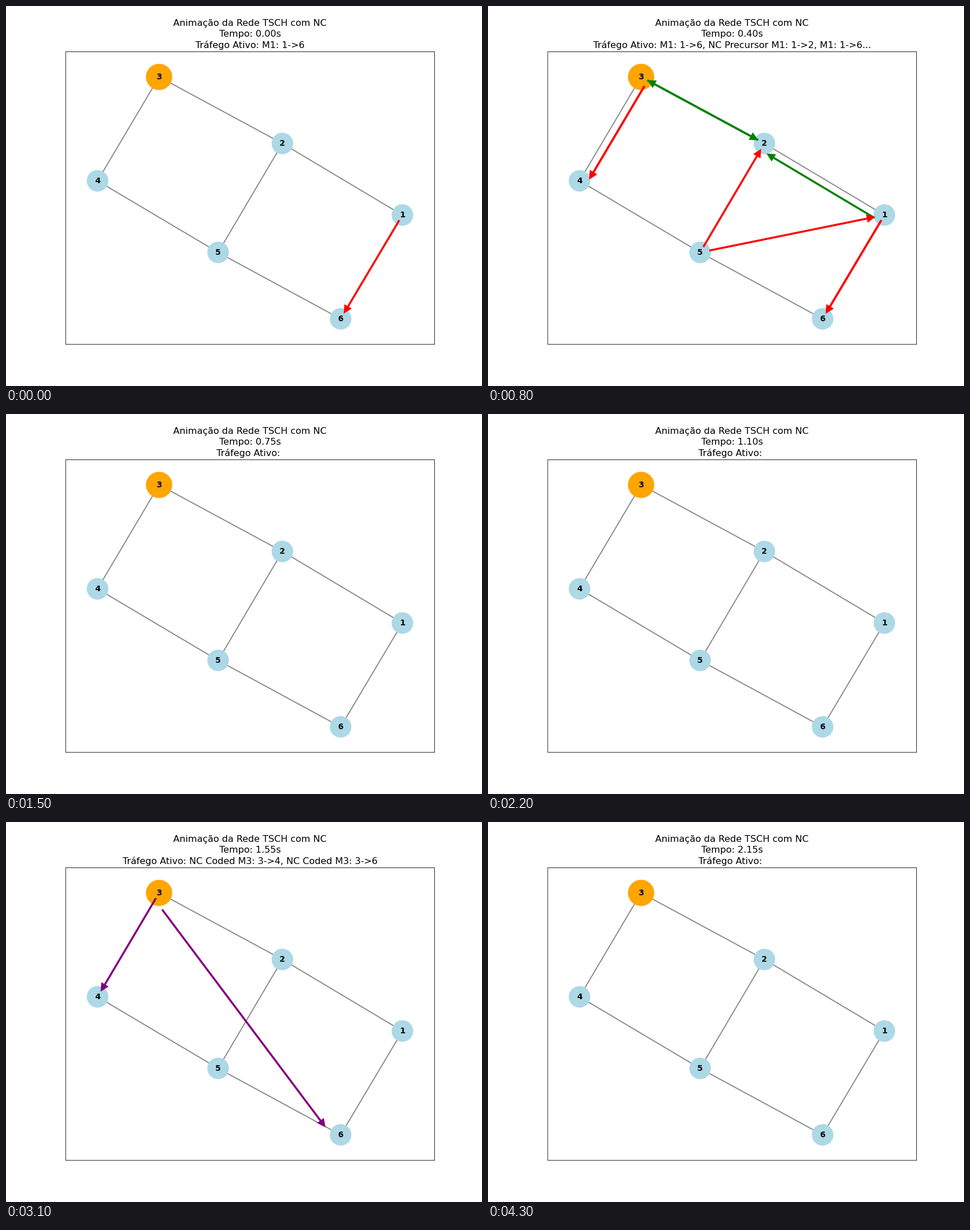
Recreate the animation shown at these times as a matplotlib script. Size 837 by 669 pixels, loop 4400 ms.

```python
import numpy as np
import matplotlib.pyplot as plt
from matplotlib.animation import FuncAnimation
from matplotlib.patches import Circle, FancyArrowPatch, Rectangle

W, H, DPI = 837, 669, 64
PT = 83.66 / DPI         # scales point sizes to the stage
FRAMES, STEP = 44, 0.05  # seconds of network time per frame
HOLD = 10                # frames each transmission stays active

NODES = {
    1: (697, 368), 2: (486, 242), 3: (269.2, 124.8),
    4: (161, 307.8), 5: (373, 433.8), 6: (588.4, 550.8),
}
EDGES = [(1, 2), (2, 3), (3, 4), (4, 5), (5, 6), (1, 6), (2, 5)]
COLORS = {"": "red", "NC Precursor ": "green", "NC Coded ": "purple"}

# first frame, kind, message, sender, receiver, sideways shift in px
EVENTS = [
    (0, "", "M1", 1, 6, 0),
    (1, "NC Precursor ", "M1", 1, 2, 13.3),
    (1, "", "M1", 1, 6, 0),
    (2, "NC Precursor ", "M2", 3, 2, 0),
    (3, "", "M2", 3, 4, 13.3),
    (3, "", "M2", 3, 4, 13.3),
    (4, "", "M3", 5, 2, 0),
    (4, "NC Precursor ", "M3", 2, 3, 0),
    (5, "", "M3", 5, 1, 0),
    (25, "NC Coded ", "M3", 3, 4, 0),
    (25, "NC Coded ", "M3", 3, 6, -13.3),
]

plt.rcParams["font.family"] = "DejaVu Sans"

fig = plt.figure(figsize=(W / DPI, H / DPI), dpi=DPI, facecolor="white")
ax = fig.add_axes([0, 0, 1, 1])
ax.set_xlim(0, W)
ax.set_ylim(H, 0)
ax.axis("off")

ax.add_patch(Rectangle((105, 80.6), 648.6, 515.1, fill=False, ec="black",
                       lw=0.75 * PT, snap=False, zorder=5))
for a, b in EDGES:
    ax.plot(*zip(NODES[a], NODES[b]), color="gray", lw=1.5 * PT, zorder=1)
for n, (x, y) in NODES.items():
    hub = n == 3
    ax.add_patch(Circle((x, y), 23.1 if hub else 18.95, lw=0, zorder=2,
                        fc="orange" if hub else "lightblue"))
    ax.text(x, y, str(n), size=12 * PT, weight="bold",
            ha="center", va="center", zorder=3)

title = ax.text(429, 73.6, "", size=14 * PT, linespacing=1.3,
                ha="center", va="baseline")
arrows = []


def clear():
    while arrows:
        arrows.pop().remove()


def add_arrow(src, dst, shift, color):
    p, q = np.array(NODES[src], float), np.array(NODES[dst], float)
    d = q - p
    side = shift * np.array([d[1], -d[0]]) / np.hypot(*d)
    arrow = FancyArrowPatch(p + 0.05 * d + side, q - 0.05 * d + side,
                            arrowstyle="-|>", mutation_scale=20 * PT,
                            lw=3 * PT, color=color, shrinkA=0, shrinkB=0,
                            joinstyle="miter", capstyle="butt", zorder=4)
    arrows.append(ax.add_patch(arrow))


def update(i):
    clear()
    names = []
    for start, kind, msg, src, dst, shift in EVENTS:
        if start <= i < start + HOLD:
            names.append(f"{kind}{msg}: {src}->{dst}")
            add_arrow(src, dst, shift, COLORS[kind])
    active = ", ".join(names[:3]) + ("..." if len(names) > 3 else "")
    title.set_text("Animação da Rede TSCH com NC\n"
                   f"Tempo: {i * STEP:.2f}s\n"
                   f"Tráfego Ativo: {active}")
    return [title, *arrows]


def init():
    return update(0)


anim = FuncAnimation(fig, update, frames=FRAMES, init_func=init,
                     interval=100, repeat=True, repeat_delay=0, blit=False)
plt.show()
```
